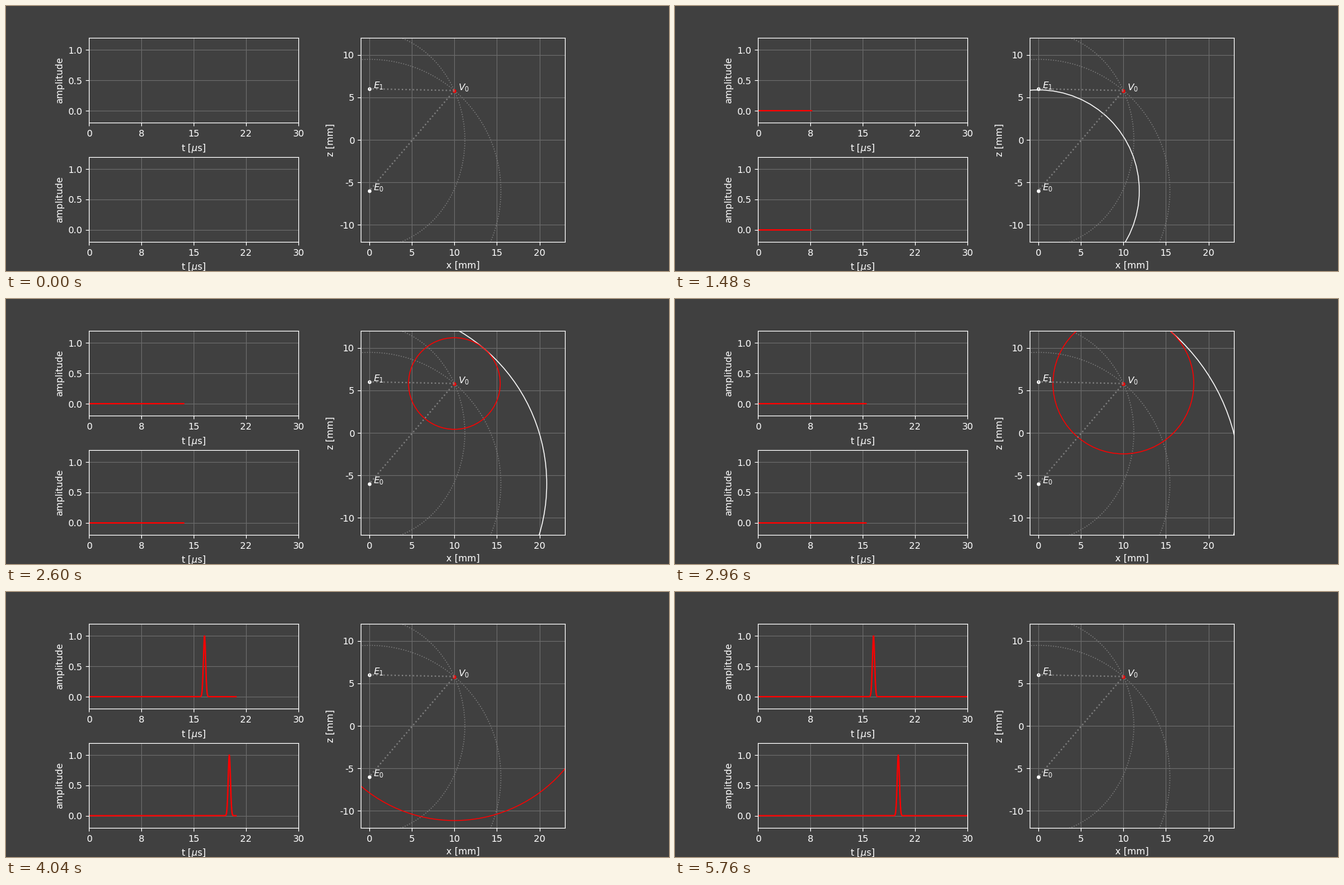
These frames come from a looping animation (1000x400 px, 8000 ms). A matplotlib script:

```python
import numpy as np
import matplotlib.pyplot as plt
from matplotlib.animation import FuncAnimation
from matplotlib.gridspec import GridSpec
from matplotlib.patches import Circle, Ellipse

BACK = "#404040"
SPEED = 1.54            # mm per microsecond
T_END = 30.0            # microseconds
SWEEP = 144             # frames until the recording is complete
FRAMES, INTERVAL = 200, 40
PULSE = 0.16            # pulse width in microseconds

plt.rcParams.update({
    "figure.facecolor": BACK,
    "axes.facecolor": BACK,
    "axes.edgecolor": "white",
    "axes.labelcolor": "white",
    "axes.unicode_minus": False,
    "axes.grid": True,
    "axes.axisbelow": True,
    "grid.color": "#696969",
    "text.color": "white",
    "xtick.color": "white",
    "ytick.color": "white",
    "font.family": "DejaVu Sans",
})

emitter = np.array([0.0, -6.0])
receiver = np.array([0.0, 6.0])
target = np.array([10.0, 5.8])

path_out = np.hypot(*(target - emitter))
path_back = np.hypot(*(target - receiver))
t_hit = path_out / SPEED
echoes = [t_hit + path_back / SPEED, 2 * t_hit]

fig = plt.figure(figsize=(10, 4), dpi=100)
grid = GridSpec(2, 2, figure=fig, width_ratios=[3, 4], wspace=0.1, hspace=0.4,
                left=0.125, right=0.9, bottom=0.11, top=0.88)


def signal_axes(row):
    ax = fig.add_subplot(grid[row, 0])
    ticks = np.linspace(0, T_END, 5)
    ax.set(xlim=(0, T_END), ylim=(-0.2, 1.2),
           xlabel=r"t [$\mu$s]", ylabel="amplitude")
    ax.set_xticks(ticks, [f"{t:.0f}" for t in ticks])
    ax.set_yticks([0, 0.5, 1])
    return ax.plot([], [], color="red", lw=1.5)[0]


def field_axes():
    ax = fig.add_subplot(grid[:, 1])
    ax.set_aspect("equal")
    ax.set(xlim=(-1, 23), ylim=(-12, 12), xlabel="x [mm]", ylabel="z [mm]",
           xticks=range(0, 21, 5), yticks=range(-10, 11, 5))
    return ax


def add_point(ax, pos, name, color):
    ax.plot(*pos, ".", color=color, ms=6)
    ax.text(pos[0] + 0.45, pos[1], f"${name}$")


def add_ray(ax, end):
    ax.plot(*zip(target, end), ":", color="gray", lw=1.5)


def add_wave(ax, center, color):
    wave = Circle(center, 1, fill=False, ec=color, lw=1, visible=False)
    return ax.add_patch(wave)


traces = [signal_axes(0), signal_axes(1)]
field = field_axes()
add_point(field, emitter, "E_0", "white")
add_point(field, receiver, "E_1", "white")
add_point(field, target, "V_0", "red")
add_ray(field, emitter)
add_ray(field, receiver)

# Points of equal travel time: circle for E0-E0, ellipse for E0-E1
dotted = dict(fill=False, ec="gray", ls=":", lw=1)
major = path_out + path_back
minor = np.sqrt(major**2 - np.sum((receiver - emitter)**2))
field.add_patch(Circle(emitter, path_out, **dotted))
field.add_patch(Ellipse((0, 0), minor, major, **dotted))

sent = add_wave(field, emitter, "white")
scattered = add_wave(field, target, "red")


def set_wave(wave, age):
    wave.set_visible(age > 0)
    wave.set_radius(max(age, 0) * SPEED)


def update(frame):
    now = T_END * min(frame, SWEEP) / SWEEP
    t = np.linspace(0, now, 10 * min(frame, SWEEP) + 1)
    for trace, echo in zip(traces, echoes):
        trace.set_data(t, np.exp(-0.5 * ((t - echo) / PULSE)**2))
    set_wave(sent, now)
    set_wave(scattered, now - t_hit)
    return [*traces, sent, scattered]


anim = FuncAnimation(fig, update, frames=FRAMES, interval=INTERVAL,
                     init_func=lambda: update(0), repeat=True,
                     repeat_delay=0, blit=False)
plt.show()
```
